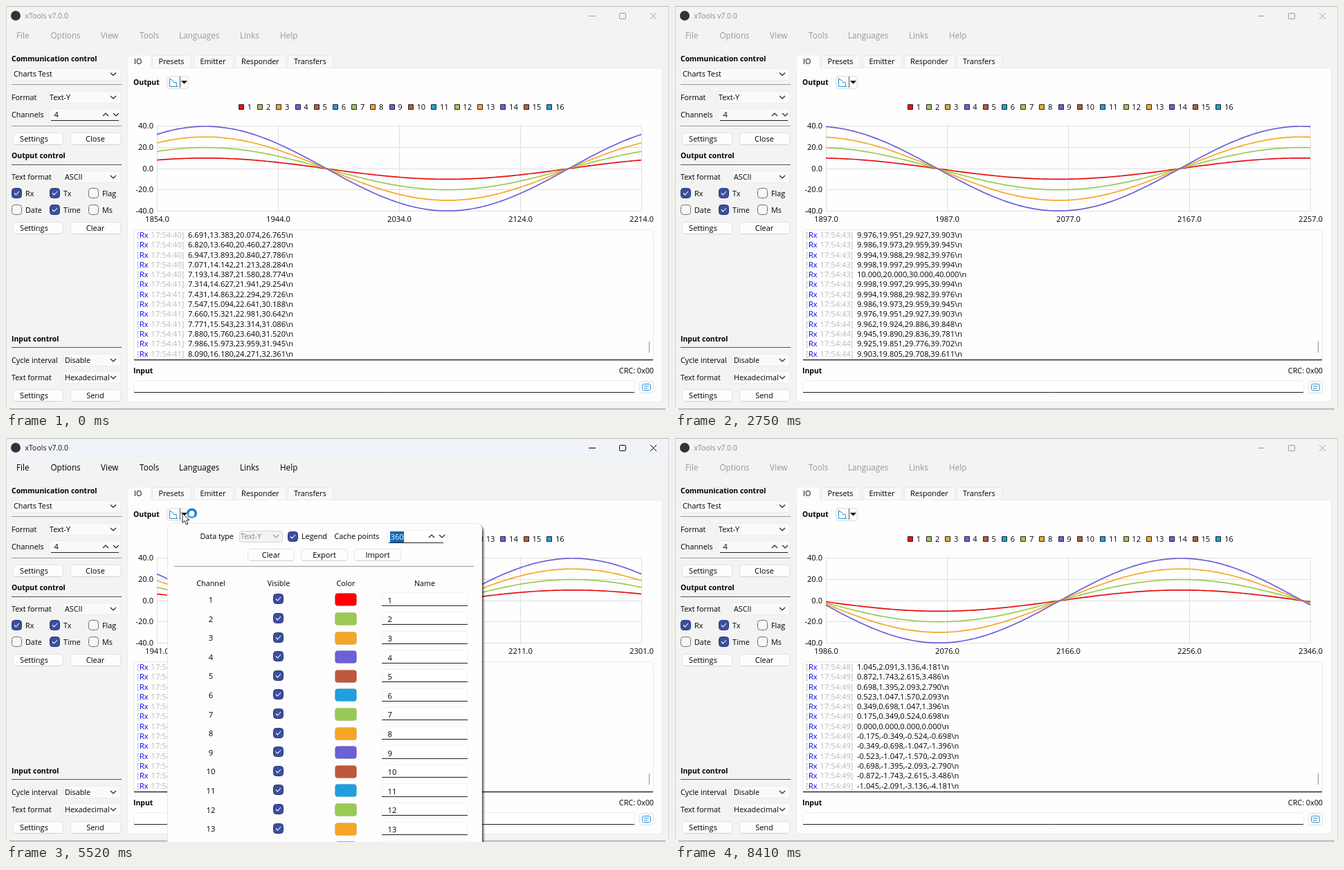
Write an HTML page with a canvas that moves like this. It is 958 by 584 pixels and loops after 8.47 s.

```html
<!DOCTYPE html>
<html lang="en">
<head>
<meta charset="utf-8">
<title>xTools</title>
<style>
html, body { margin: 0; width: 958px; height: 584px; overflow: hidden; background: #f3f3f3 }
canvas { display: block }
</style>
</head>
<body>
<canvas id="stage" width="958" height="584"></canvas>
<script>
const g = document.getElementById('stage').getContext('2d');
const LOOP = 8470, PANEL = '#fdfdfd', NAVY = '#3c4f9d', BLUE = '#2a8fd8';
const FAMILY = '"Open Sans", "Noto Sans", sans-serif';
const PALETTE = ['#209fdf', '#99ca53', '#f6a625', '#6d5fd5', '#bf593e'];
const channelColor = i => i === 1 ? '#ff0000' : PALETTE[(i - 1) % 5];

// [time, newest charted sample, newest logged sample]
const KEYS = [[0, 2214, 2214], [930, 2228, 2230], [2000, 2245, 2247], [3570, 2271, 2271],
  [5520, 2301, 2302], [6950, 2322, 2324], [8410, 2346, 2346]];

function sampleAt(t, col) {
  let k = 1;
  while (k < KEYS.length - 1 && t > KEYS[k][0]) k++;
  const a = KEYS[k - 1], b = KEYS[k];
  const p = Math.min(1, (t - a[0]) / (b[0] - a[0]));
  return Math.floor(a[col] + (b[col] - a[col]) * p + 1e-6);
}
const wave = n => Math.sin((n % 360) * Math.PI / 180);

// y is the middle of the capitals; the baseline sits on a whole pixel
function text(s, x, y, { size = 10.8, color = '#000', align = 'left', bold = false } = {}) {
  g.font = `${bold ? 700 : 400} ${size}px ${FAMILY}`;
  g.fillStyle = color;
  g.textAlign = align;
  g.fillText(s, x, Math.round(y + 3.9));
}
const title = (s, x, y) => text(s, x, y, { size: 10.45, bold: true });

function box(x, y, w, h, fill, stroke, r = 3) {
  g.beginPath();
  g.roundRect(x + .5, y + .5, w - 1, h - 1, r);
  if (fill) { g.fillStyle = fill; g.fill(); }
  if (stroke) { g.strokeStyle = stroke; g.lineWidth = 1; g.stroke(); }
}
function path(points, color, width = 1) {
  g.beginPath();
  points.forEach(([x, y]) => g.lineTo(x, y));
  g.strokeStyle = color;
  g.lineWidth = width;
  g.stroke();
}
const hline = (x1, x2, y, color = '#222', width = 1) => path([[x1, y + .5], [x2, y + .5]], color, width);
const chevron = (x, y, d = 1, color = '#222') =>
  path([[x - 4, y - 2 * d], [x, y + 2 * d], [x + 4, y - 2 * d]], color, 1.2);

function combo(s, x, y, left) {
  box(left, Math.round(y - 9), 166 - left, 18, '#fafafa', '#ececec');
  text(s, x, y);
  chevron(155, y);
}
function button(s, x, y, w, cx = x + w / 2) {
  box(x, y - 9, w, 18, PANEL, '#e2e2e2', 4);
  hline(x + 3, x + w - 3, y + 8, '#d0d0d0');
  text(s, cx, y, { align: 'center', size: 11 });
}
function check(x, y, on) {
  box(x - 7.5, y - 7.5, 15, 15, on ? NAVY : '#f7f7f7', on ? '#2a356f' : '#707070', 4);
  if (on) path([[x - 3.5, y], [x - 1, y + 2.5], [x + 3.5, y - 2.5]], '#fff', 1.1);
}

function drawWindow(active) {
  const ink = active ? '#000' : '#999';
  g.fillStyle = '#f3f3f3';
  g.fillRect(0, 0, 958, 584);
  g.fillStyle = active ? '#f0f4f9' : '#f3f3f3';
  g.fillRect(0, 0, 958, 28);

  g.fillStyle = '#333';
  g.beginPath();
  g.arc(14, 14, 7, 0, 7);
  g.fill();
  text('xTools v7.0.0', 27.5, 14.5, { size: 10.5, color: active ? '#111' : '#888' });
  hline(842, 852, 14, ink);
  box(886, 10, 10, 9, null, ink, 1);
  path([[931, 10], [940, 19]], ink);
  path([[940, 10], [931, 19]], ink);
  [['File', 15], ['Options', 64.5], ['View', 137], ['Tools', 193], ['Languages', 250], ['Links', 338], ['Help', 396]]
    .forEach(([s, x]) => text(s, x, 43, { size: 11.7, color: ink }));
}

function drawSidebar() {
  title('Communication control', 8, 76);
  combo('Charts Test', 11, 98.5, 8);
  hline(8, 167, 113, '#999');
  text('Format', 8, 132);
  combo('Text-Y', 63, 132, 62);
  text('Channels', 8, 157.5);
  box(62, 148, 104, 18, '#fafafa', '#ececec');
  text('4', 69.5, 157.5, { size: 11.2 });
  chevron(144, 157, -1);
  chevron(159, 157);
  hline(65, 163, 165);
  hline(8, 167, 173, '#999');
  button('Settings', 10, 192, 73, 40.5);
  button('Close', 93, 192, 73, 129);

  title('Output control', 8, 216);
  hline(8, 167, 229, '#555');
  text('Text format', 8, 247);
  combo('ASCII', 85, 247, 82);
  [['Rx', 15.5, 270.5, 1], ['Tx', 70.5, 270.5, 1], ['Flag', 126.5, 270.5, 0],
   ['Date', 15.5, 294.5, 0], ['Time', 70.5, 294.5, 1], ['Ms', 126.5, 294.5, 0]].forEach(([s, x, y, on]) => {
    check(x, y, on);
    text(s, x + 12.5, y + .5);
  });
  button('Settings', 10, 321, 73, 40.5);
  button('Clear', 93, 321, 73, 129);

  title('Input control', 8, 481);
  hline(8, 167, 493, '#555');
  text('Cycle interval', 8, 512);
  combo('Disable', 85, 512, 82);
  text('Text format', 8, 537);
  combo('Hexadecimal', 85, 537, 82);
  button('Settings', 10, 563, 73, 40.5);
  button('Send', 93, 563, 73, 129);
}

function drawPanel() {
  [['Presets', 211, 57, 220.5], ['Emitter', 271, 58, 280.5], ['Responder', 331, 74, 340], ['Transfers', 407, 66, 416]]
    .forEach(([s, x, w, tx]) => {
      box(x, 71, w, 20, '#f8f8f8', '#e8e8e8');
      text(s, tx, 80.5);
    });
  box(175, 89, 774, 484, PANEL, '#ececec', 5);
  box(176, 71, 33, 22, PANEL, null, 4);
  text('IO', 185, 80.5);

  title('Output', 184, 110.5);
  box(232, 101, 32, 19, PANEL, '#dcdcdc', 4);
  path([[236.5, 104], [236.5, 116.5], [248, 116.5]], BLUE);
  path([[237, 105.5], [241, 107.5], [243, 111], [246, 110], [246.5, 116]], BLUE);
  path([[251.5, 102], [251.5, 118]], '#555');
  g.fillStyle = '#000';
  g.beginPath();
  g.moveTo(253, 108); g.lineTo(262, 108); g.lineTo(257.5, 112.5);
  g.fill();

  title('Input', 184, 527.5);
  text('CRC: 0x00', 936, 527.5, { align: 'right' });
  box(184, 541, 725, 18, '#fff', '#eee');
  hline(185, 908, 558);
  box(915, 542, 21, 18, PANEL, '#dedede', 4);
  box(919, 546, 13, 10, null, BLUE, 2);
  hline(922, 929, 549, BLUE);
  hline(922, 927, 552, BLUE);
}

function drawChart(last) {
  const first = last - 360;
  g.fillStyle = '#fefefe';
  g.fillRect(185, 124, 751, 196);

  let x = 340;
  for (let i = 1; i <= 16; i++) {
    box(Math.round(x) - 4, 142, 8, 8, i === 1 ? '#e81010' : channelColor(i), '#222', 0);
    text(i, x + 8.7, 146, { size: 11.1 });
    x += i < 10 ? 27.2 : 33.4;
  }
  for (let i = 0; i < 5; i++) {
    const gx = 218 + 175 * i, gy = Math.round(173 + 30.75 * i);
    hline(218, 918, gy, '#dedede');
    path([[gx + .5, 173], [gx + .5, 297]], '#dedede');
    text((40 - 20 * i).toFixed(1), 213, gy, { size: 11.1, align: 'right' });
    text((first + 90 * i).toFixed(1), gx + .5, 308.5, { size: 11.2, align: 'center' });
  }
  for (let c = 1; c <= 4; c++) {
    const pts = [];
    for (let i = 0; i <= 360; i += 2) pts.push([218 + i * 700 / 360, 235.1 - 15.28 * c * wave(first + i)]);
    path(pts, c === 1 ? '#e60f12' : channelColor(c), 1.7);
  }
}

function drawLog(last) {
  box(184, 323, 752, 190, '#fefefe', '#e9e9e9', 4);
  hline(185, 935, 511, '#333', 1.3);
  path([[929.5, 485], [929.5, 501]], '#999', 1.2);
  for (let i = 0; i < 13; i++) {
    const n = last - 12 + i, y = 331 + 14.31 * i;
    const gray = { size: 11.2, color: '#b9b9b9' };
    text('[', 189, y, gray);
    text('Rx', 193, y, { size: 11, color: '#0000ee' });
    text(`17:54:${41 + Math.floor((n - 2207) / 16)}]`, 209.5, y, gray);
    text([10, 20, 30, 40].map(a => (a * wave(n)).toFixed(3)).join() + '\\n', 263, y, { size: 11.15 });
  }
}

function drawPopup() {
  g.save();
  g.shadowColor = 'rgba(0,0,0,.7)';
  g.shadowBlur = 3;
  g.shadowOffsetX = 2.5;
  g.shadowOffsetY = 3;
  box(233, 123, 455, 480, PANEL, null, 8);
  g.restore();
  box(233, 123, 455, 480, PANEL, '#e6e6e6', 8);

  text('Data type', 280.5, 142.5);
  box(337, 134, 63, 17, '#f3f3f3', '#d4d4d4');
  text('Text-Y', 339, 142.5, { color: '#888' });
  chevron(390, 142, 1, '#999');
  check(414.5, 142.5, true);
  text('Legend', 427, 142.5);
  text('Cache points', 474.5, 142.5);
  box(551, 133, 86, 19, '#fff', '#eee');
  g.fillStyle = '#0f66b8';
  g.fillRect(555, 135, 20, 16);
  text('360', 555.5, 143, { size: 11.2, color: '#fff' });
  chevron(615, 142, -1);
  chevron(630, 142);
  hline(553, 632, 151);
  button('Clear', 349, 169, 68);
  button('Export', 426, 169, 68);
  button('Import', 503, 169, 68);
  hline(243, 676, 185, '#999');
  [['Channel', 296], ['Visible', 394], ['Color', 491], ['Name', 605]]
    .forEach(([s, x]) => text(s, x, 210, { align: 'center' }));
  for (let i = 1; i <= 14; i++) {
    const y = 233.3 + 27.6 * (i - 1), row = Math.round(y);
    text(i, 296, y + .7, { size: 11.2, align: 'center' });
    check(393.5, row - .5, true);
    box(475, row - 9, 32, 19, channelColor(i), 'rgba(0,0,0,.1)', 4);
    box(543, row - 10, 124, 18, '#fff', '#f1f1f1');
    text(i, 551.5, y + 1.5, { size: 11.2 });
    hline(543, 667, Math.round(y + 8.4));
  }
}

function drawCursor(t) {
  if (t < 4400 || t > 6700) return;
  const clamp = p => Math.max(0, Math.min(1, p));
  const ease = p => p * p * (3 - 2 * p);
  const away = t < 5520 ? 1 - ease(clamp((t - 4400) / 650)) : ease(clamp((t - 6250) / 450));
  g.save();
  g.translate(255 + 630 * away, 109 + 460 * away);
  g.beginPath();
  [[0, 0], [0, 13.5], [3.3, 10.5], [5.5, 16], [8, 15], [5.8, 9.7], [10, 9.5]].forEach(([x, y]) => g.lineTo(x, y));
  g.closePath();
  g.fillStyle = '#fff';
  g.strokeStyle = '#222';
  g.lineWidth = 1;
  g.fill();
  g.stroke();
  if (t >= 5300 && t < 5700) {
    const turn = t / 160;
    [[0, 6.3, '#58aee8'], [turn, turn + 4, '#1878c8']].forEach(([a, b, color]) => {
      g.beginPath();
      g.arc(13.5, 0, 5.8, a, b);
      g.strokeStyle = color;
      g.lineWidth = 3;
      g.stroke();
    });
  }
  g.restore();
}

function draw() {
  const t = performance.now() % LOOP;
  drawWindow(t >= 5050 && t < 8250);
  drawSidebar();
  drawPanel();
  drawChart(sampleAt(t, 1));
  drawLog(sampleAt(t, 2));
  hline(0, 958, 0, '#b5b5b5');
  hline(5, 953, 582, '#a9a9a9', 1.5);
  path([[.5, 0], [.5, 580]], '#d5d5d5');
  path([[957.5, 0], [957.5, 580]], '#d5d5d5');
  if (t >= 5390 && t < 6150) drawPopup();
  drawCursor(t);
  requestAnimationFrame(draw);
}
draw();
</script>
</body>
</html>
```
